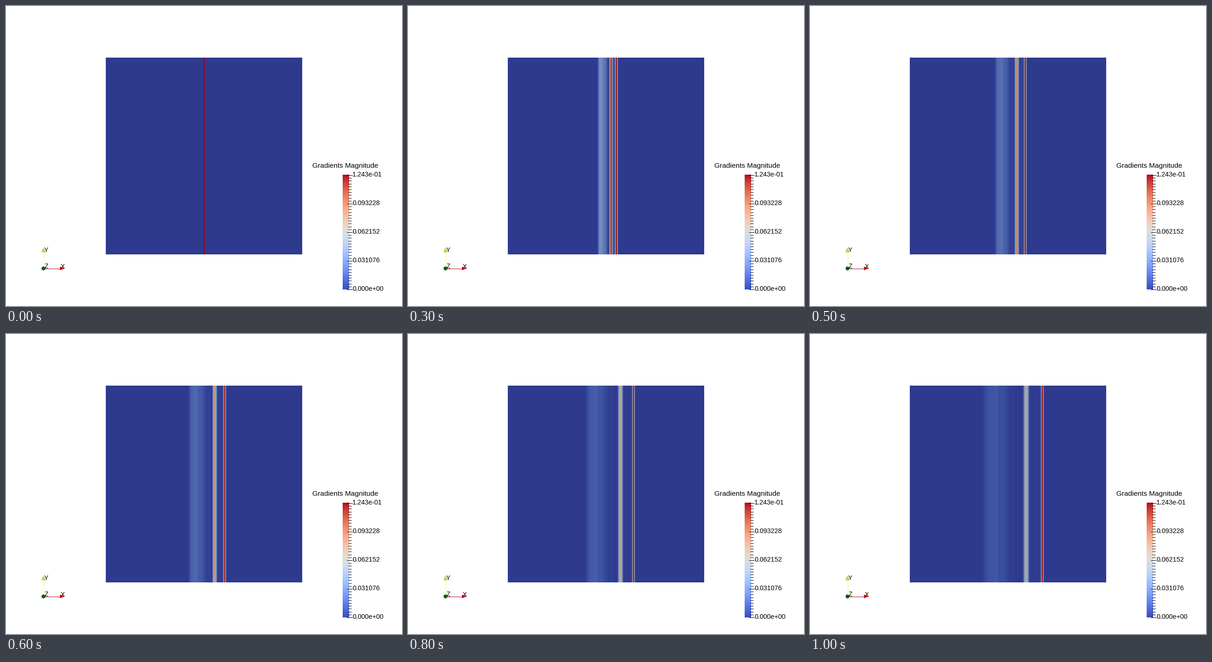
A matplotlib script that plays this animation: 861 px wide and 651 px high, repeating every 1.1 s.

```python
import numpy as np
import matplotlib.pyplot as plt
from matplotlib.animation import FuncAnimation
from matplotlib.patches import Circle, Polygon

W, H, DPI = 861, 651, 64
PX = 72 / DPI  # points per pixel
FRAMES, INTERVAL = 11, 100
LEFT, RIGHT, TOP, BOTTOM = 217, 644, 112, 539
SHADE = np.array([0.78, 0.765, 0.74])  # surface lighting
cmap = plt.get_cmap("coolwarm")
xs = np.arange(LEFT, RIGHT) + 0.5

fig = plt.figure(figsize=(W / DPI, H / DPI), dpi=DPI, facecolor="white")
ax = fig.add_axes([0, 0, 1, 1])
ax.axis("off")


def line(x0, y0, x1, y1, color="black", width=1):
    ax.plot([x0, x1], [y0, y1], color=color, lw=width * PX,
            solid_capstyle="butt")


def label(x, y, text, size=14.4):
    ax.text(x, y, text, fontsize=size * PX, family="Liberation Sans",
            color="black", va="baseline", zorder=5)


def gradient(t):
    """Density gradient of a shock tube at step t, scaled to 0..1."""
    if t == 0:
        return (abs(xs - 431) < 1).astype(float)
    contact, shock = 429.4 + 4.06 * t, 431.1 + 7.39 * t
    split, level = 428 - 2 * t, 0.9 / t

    fan_x = [428 - 5.4 * t, 428 - 4.2 * t, split, split + 1, 430 - 0.8 * t, 434]
    fan = level * np.interp(xs, fan_x, [0, 0.8, 1, 0.7, 0.65, 0])

    wake = (xs > 428) & (xs < min(446, contact - 3))
    ripple = 0.3 * level * wake * (0.5 + 0.5 * np.cos(2 * np.pi * xs / 3.5))

    gap = 0.6 / t**2 * ((xs > contact) & (xs < shock))
    width = 1.6 * np.sqrt(t)
    slip = 1.55 / np.sqrt(t) * np.exp(-abs((xs - contact) / width) ** 3)
    front = 1.08 * np.exp(-0.5 * ((xs - shock) / 1.45) ** 2)
    return np.clip(np.maximum(slip, front) + fan + ripple + gap, 0, 1)


def strip(t):
    return (cmap(gradient(t))[:, :3] * SHADE)[None]


plane = ax.imshow(strip(0), extent=(LEFT, RIGHT, BOTTOM, TOP),
                  interpolation="nearest", aspect="auto")

# Colour legend
BAR_TOP, BAR_BOTTOM = 366, 615
ax.imshow(np.linspace(1, 0, 249)[:, None], cmap=cmap, vmin=0, vmax=1,
          extent=(732, 746, BAR_BOTTOM, BAR_TOP), interpolation="nearest",
          aspect="auto")
for i, y in enumerate(np.linspace(BAR_TOP + 0.5, BAR_BOTTOM - 0.5, 41)):
    y = np.floor(y) + 0.5
    line(741 if i % 10 == 0 else 744, y, 752.5 if i % 10 == 0 else 751, y)
label(666, 351, "Gradients Magnitude", 15.4)
values = ["1.243e-01", "0.093228", "0.062152", "0.031076", "0.000e+00"]
for i, value in enumerate(values):
    label(753, 370 + 62 * i, value)

# Orientation axes
line(81.5, 566, 81.5, 534, "#eeee90")
line(85, 569.5, 118, 569.5, "#b00030")
ax.add_patch(Polygon([(78, 534), (79.5, 529), (81.5, 526), (83.5, 529), (85, 534)],
                     fc="#e2e200", ec="#77770a", lw=0.5 * PX, zorder=3))
ax.add_patch(Polygon([(117.5, 566), (127, 569.5), (117.5, 573)],
                     fc="#ee0000", ec="#990000", lw=0.5 * PX, zorder=3))
ax.add_patch(Circle((81.5, 569.5), 4.2, fc="#006400", ec="none", zorder=3))
label(119, 570, "X", 13.5)
label(83, 534, "Y", 13.5)
label(83.5, 569, "Z", 13.5)

ax.set_xlim(0, W)
ax.set_ylim(H, 0)


def update(t):
    plane.set_data(strip(t))
    return (plane,)


anim = FuncAnimation(fig, update, frames=FRAMES, interval=INTERVAL,
                     repeat=True, repeat_delay=0, blit=False)
plt.show()
```
